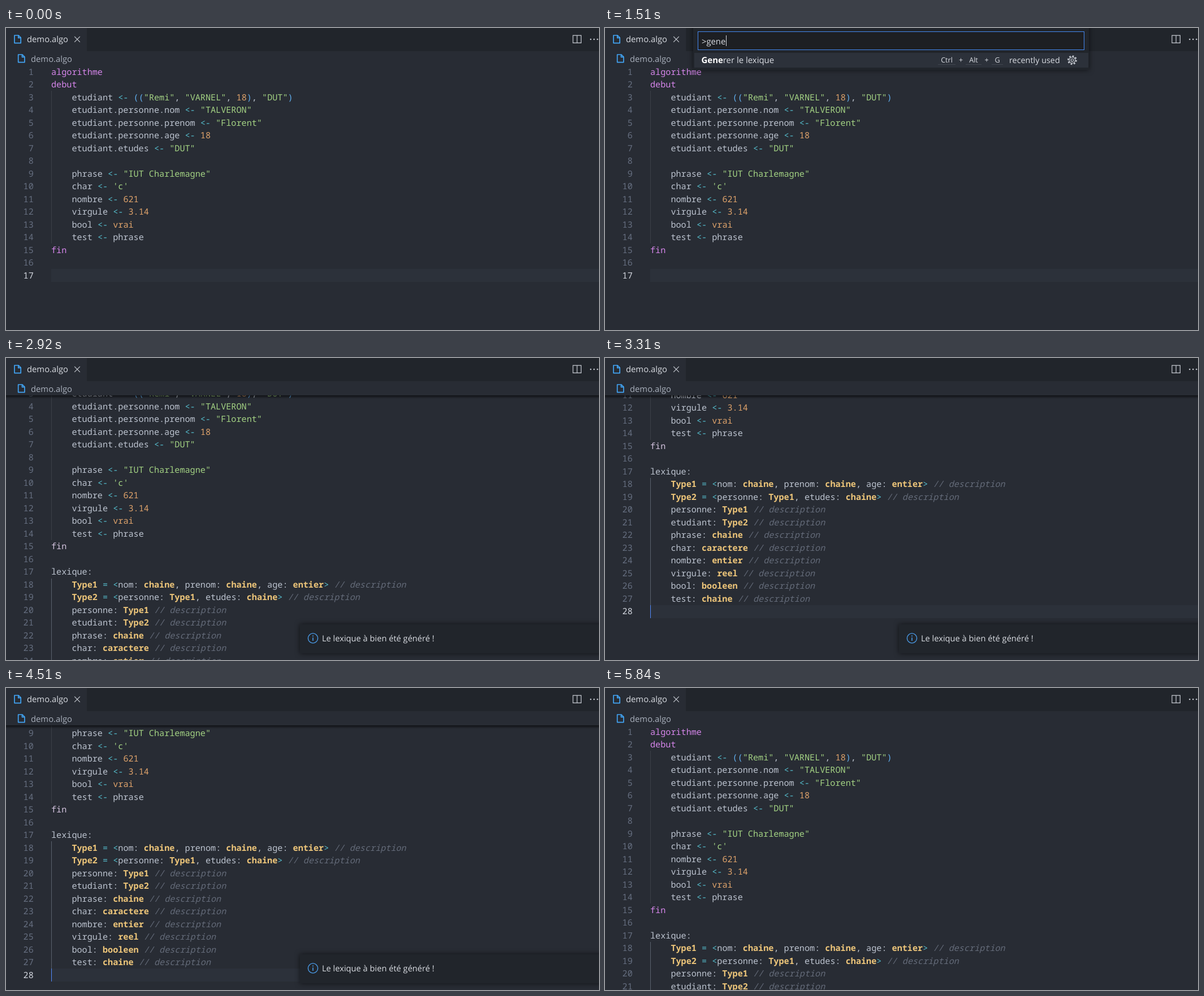
An HTML page that plays this animation: 1049 px wide and 534 px high, repeating every 5970 ms.

```html
<!DOCTYPE html>
<html lang="fr">
<head>
<meta charset="utf-8">
<title>demo.algo</title>
<style>
html, body { margin: 0; width: 100%; height: 100%; overflow: hidden; background: #282c34; }
svg { display: block; width: 1049px; height: 534px; }
rect { shape-rendering: crispEdges; }
text { white-space: pre; fill: #d9dce2; font: 14.8px "Open Sans", "Noto Sans", sans-serif; text-rendering: geometricPrecision; }
#code text { fill: #bcc3cf; font: 500 15.17px "Noto Sans Mono", "DejaVu Sans Mono", monospace; }
#code .num { fill: #666f80; text-anchor: end; }
#code .num.active { fill: #d3d7df; }
.comment { fill: #646b79; font-style: italic; }
.string { fill: #a3d283; }
.op { fill: #56c0d0; }
.paren { fill: #61afef; }
.value { fill: #dfa36b; }
.type { fill: #eec67a; font-weight: 600; }
.keyword { fill: #d585ea; }
.pale .keyword { fill: #d3c3de; }
.plain tspan { fill: #bcc3cf; font-style: normal; font-weight: 500; }
.line { fill: none; stroke: #c5c9d0; stroke-width: 1.2; }
.doc { fill: none; stroke: #42a5f5; stroke-width: 1.7; stroke-linejoin: round; }
.shadow { fill: #21252b; filter: drop-shadow(0 0 5px rgba(0, 0, 0, .6)); }
#list text { font-size: 14.95px; }
#list .hit { font-weight: 700; fill: #fff; }
#list .side { font-size: 14.4px; }
#list .key { font-size: 12.6px; }
#list .group { fill: #3f94ff; }
</style>
</head>
<body>
<svg id="stage" viewBox="0 0 1049 534">
  <defs>
    <linearGradient id="fade" x2="0" y2="1">
      <stop stop-color="#000" stop-opacity=".6"/>
      <stop offset="1" stop-color="#000" stop-opacity="0"/>
    </linearGradient>
    <path id="doc" class="doc" d="M1 1H8.2L12.2 5V14.6H1ZM7.8 1V5.4H12.2"/>
  </defs>

  <g id="code">
    <rect id="current" x="80" width="969" height="22.5" fill="#2c313a"/>
    <g id="base"></g>
    <g id="lexicon"></g>
    <rect id="caret" x="80" width="1" height="22.5" fill="#528bff"/>
  </g>

  <rect width="1049" height="66" fill="#282c34"/>
  <rect x="142.5" width="907" height="41" fill="#21252b"/>
  <rect id="edge" y="66" width="1049" height="6" fill="url(#fade)"/>
  <use href="#doc" x="14" y="12"/>
  <text x="37" y="25">demo.algo</text>
  <path class="line" d="M121.2 15.2L130.8 24.8M130.8 15.2L121.2 24.8"/>
  <use href="#doc" x="20.7" y="46"/>
  <text x="44" y="59.5" style="fill:#a9b0bc">demo.algo</text>
  <path class="line" d="M1003 13.2H1017.4V26.4H1003ZM1010.2 13V26.4"/>
  <g fill="#c5c9d0"><circle cx="1034.3" cy="20" r="1.3"/><circle cx="1040.3" cy="20" r="1.3"/><circle cx="1046.3" cy="20" r="1.3"/></g>

  <g id="toast">
    <rect class="shadow" x="520" y="471" width="560" height="51"/>
    <circle cx="543" cy="495.5" r="8.6" fill="none" stroke="#4a9be8" stroke-width="1.4"/>
    <path d="M543 494.2V500M543 490.6V492.4" stroke="#4a9be8" stroke-width="1.6"/>
    <text x="559" y="501.4" style="font-size:14.65px">Le lexique à bien été généré !</text>
    <path id="close" class="line" d="M1026 490.5L1036 500.5M1036 490.5L1026 500.5"/>
  </g>

  <g id="palette">
    <rect id="panel" class="shadow" x="156" y="-10" width="700"/>
    <rect x="164.5" y="6.5" width="683" height="32" fill="#1d1f23" stroke="#4488f0"/>
    <text id="query" x="171" y="28.5"></text>
    <rect id="cursor" y="13" width="1" height="19" fill="#d7dae0"/>
    <g id="list"></g>
    <rect id="thumb" x="843" y="44" width="12" height="23.5" fill="#3c424e"/>
  </g>
</svg>

<script>
const LOOP = 5970, ROW = 22.5, TOP = 66.2, CHAR = 9.1, NOTCH = 59.15;
const $ = id => document.getElementById(id);

const program = `algorithme
debut
    etudiant <- (("Remi", "VARNEL", 18), "DUT")
    etudiant.personne.nom <- "TALVERON"
    etudiant.personne.prenom <- "Florent"
    etudiant.personne.age <- 18
    etudiant.etudes <- "DUT"

    phrase <- "IUT Charlemagne"
    char <- 'c'
    nombre <- 621
    virgule <- 3.14
    bool <- vrai
    test <- phrase
fin
`.split("\n");

const lexicon = `lexique:
    Type1 = <nom: chaine, prenom: chaine, age: entier> // description
    Type2 = <personne: Type1, etudes: chaine> // description
    personne: Type1 // description
    etudiant: Type2 // description
    phrase: chaine // description
    char: caractere // description
    nombre: entier // description
    virgule: reel // description
    bool: booleen // description
    test: chaine // description
`.split("\n");

const commands = [
  "Generer le lexique",
  "C/C++: Edit Configurations (JSON)",
  "UMLet: Export As PNG..",
  "(Internal) Build a Target by Name",
  "C/C++: Build and Debug Active File",
  "C/C++: Change Configuration Provider...",
  "C/C++: Copy vcpkg install command to clipboard",
  "C/C++: Disable Error Squiggles"
];
const RECENT = 3;

function add(parent, tag, attrs = {}, content = "") {
  const el = document.createElementNS("http://www.w3.org/2000/svg", tag);
  for (const k in attrs) el.setAttribute(k, attrs[k]);
  el.textContent = content;
  return parent.appendChild(el);
}

const token = /(?<comment>\/\/.*)|(?<string>"[^"]*"|'[^']*')|(?<op><-|[<>=])|(?<paren>[()])|\b(?<value>\d[\d.]*|vrai)\b|\b(?<type>Type\d|chaine|entier|caractere|reel|booleen)\b|\b(?<keyword>algorithme|debut|fin)\b/g;

function addLine(parent, source, index) {
  const y = TOP + ROW * index + 16.4;
  const num = add(parent, "text", { class: "num", x: 48.8, y }, index + 1);
  const line = source.trimStart();
  const text = add(parent, "text", { x: 80 + CHAR * (source.length - line.length), y });
  let end = 0;
  for (const m of line.matchAll(token)) {
    text.append(line.slice(end, m.index));
    const kind = Object.keys(m.groups).find(k => m.groups[k]);
    add(text, "tspan", { class: kind }, m[0]);
    end = m.index + m[0].length;
  }
  text.append(line.slice(end));
  return num;
}

function addGuide(parent, from, to, fill) {
  add(parent, "rect", { x: 80, y: TOP + ROW * (from - 1), width: 1, height: ROW * (to - from + 1), fill });
}

addGuide($("base"), 3, 14, "#3b4048");
program.forEach((s, i) => addLine($("base"), s, i));
const num17 = add($("base"), "text", { class: "num active", x: 48.8, y: TOP + ROW * 16 + 16.4 }, 17);
addGuide($("lexicon"), 18, 27, "#5a606c");
lexicon.forEach((s, i) => addLine($("lexicon"), s, i + 16).classList.toggle("active", i === 11));

function addGear(list, cx, cy) {
  const ring = (r, extra) => add(list, "circle", { cx, cy, r, class: "line", ...extra });
  ring(7.2, { "stroke-dasharray": "2.8 2.85", style: "stroke-width:2.4" });
  ring(5.4);
  ring(2.3);
}

function fillPalette(query) {
  const list = $("list");
  list.replaceChildren();
  const found = commands.filter(c => c.toLowerCase().includes(query));
  $("panel").setAttribute("height", 58 + 26 * found.length);
  add(list, "rect", { x: 158, y: 44, width: 697, height: 26, fill: "#2c313a" });
  let grouped = false;
  found.forEach((name, i) => {
    const y = 62.3 + 26.04 * i, at = name.toLowerCase().indexOf(query);
    const text = add(list, "text", { x: 170.5, y });
    text.append(name.slice(0, at));
    add(text, "tspan", { class: "hit" }, name.slice(at, at + query.length));
    text.append(name.slice(at + query.length));
    if (!grouped && commands.indexOf(name) >= RECENT) {
      grouped = true;
      add(list, "rect", { x: 158, y: Math.round(y - 18.5), width: 697, height: 1, fill: "#4488f0" });
      add(list, "text", { class: "side group", x: 718, y }, "other commands");
    }
  });
  [["Ctrl", 604.5, 31], ["Alt", 652, 28], ["G", 694, 20]].forEach(([key, x, w]) => {
    add(list, "text", { class: "key", x, y: 61, "text-anchor": "middle" }, key);
    add(list, "rect", { x: x - w / 2, y: 64, width: w, height: 1, fill: "#41464f" });
  });
  [629.5, 675].forEach(x => add(list, "text", { class: "key", x, y: 61, "text-anchor": "middle" }, "+"));
  add(list, "text", { class: "side", x: 715, y: 62.3 }, "recently used");
  addGear(list, 826.5, 56.8);

  $("query").textContent = ">" + query;
  $("cursor").setAttribute("x", 171.5 + $("query").getComputedTextLength());
}

// Tracks hold [start ms, value]; each value lasts until the next start.
const tracks = {
  caret: [[0, 0], [180, 1], [350, 0], [520, 1], [650, 0], [1810, 1], [3780, 0], [4080, 1]],
  query: [[0, null], [650, ""], [1120, "g"], [1250, "ge"], [1380, "gen"], [1510, "gene"], [1680, null]],
  thumb: [[0, 0], [950, 1], [1250, 0]],
  lexicon: [[0, 0], [1810, 1], [1980, 2]],
  scroll: [[0, 0], [2920, 1], [3050, 2], [3180, 3], [3310, 4], [3480, 5], [3950, 6],
           [4210, 5], [4340, 4], [4510, 3], [4640, 2], [4770, 1], [4900, 0]],
  toast: [[0, null], [1980, [37, .25]], [2110, [26, .55]], [2280, [14, .8]], [2450, [5, .95]],
          [2580, [2, 1]], [2750, [0, 1]], [5840, null]],
  close: [[0, 0], [5070, .35], [5200, .6], [5330, .8], [5500, 1]]
};
const valueAt = (name, t) => tracks[name].findLast(([start]) => start <= t)[1];
const show = (el, on) => { el.style.display = on ? "" : "none"; };

let lastQuery;
function render(t) {
  const stage = valueAt("lexicon", t), scroll = valueAt("scroll", t) * NOTCH;
  const rowY = TOP + ROW * (stage ? 27 : 16);
  $("code").setAttribute("transform", `translate(0 ${-scroll})`);
  $("current").setAttribute("y", rowY);
  $("caret").setAttribute("y", rowY);
  show($("caret"), valueAt("caret", t));
  show($("lexicon"), stage);
  show(num17, !stage);
  $("lexicon").classList.toggle("plain", stage === 1);
  $("code").classList.toggle("pale", scroll > 45);
  show($("edge"), scroll);

  const query = valueAt("query", t);
  show($("palette"), query !== null);
  if (query !== null && query !== lastQuery) fillPalette(query);
  lastQuery = query;
  show($("thumb"), valueAt("thumb", t));

  const toast = valueAt("toast", t);
  show($("toast"), toast);
  if (toast) {
    $("toast").setAttribute("transform", `translate(0 ${toast[0]})`);
    $("toast").setAttribute("opacity", toast[1]);
  }
  $("close").setAttribute("opacity", valueAt("close", t));
}

let begin;
function tick(now) {
  begin ??= now;
  render((now - begin) % LOOP);
  requestAnimationFrame(tick);
}
render(0);
requestAnimationFrame(tick);
</script>
</body>
</html>
```
